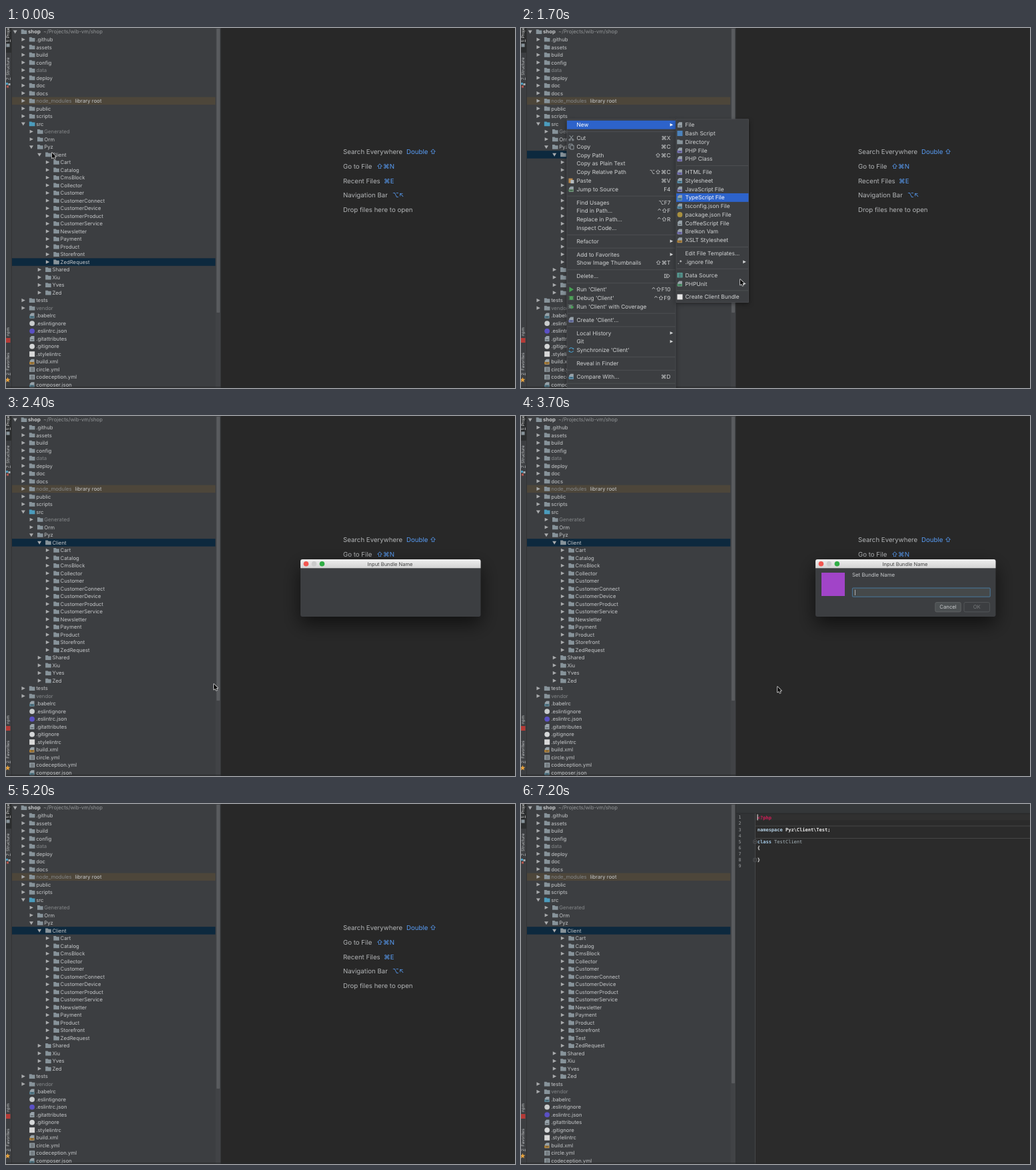
These frames come from a looping animation (764 by 540 pixels, 7.3 s). An HTML page with a canvas:

```html
<!DOCTYPE html>
<html lang="en">
<head>
<meta charset="utf-8">
<title>Create a bundle</title>
<style>
html, body { margin: 0; width: 100%; height: 100%; overflow: hidden; background: #282828; }
canvas { display: block; width: 764px; height: 540px; }
</style>
</head>
<body>
<canvas id="stage" width="764" height="540"></canvas>
<script>
const ctx = document.getElementById('stage').getContext('2d');
const LOOP = 7300, STEP = 100;
const UI = 'Inter, "DejaVu Sans", sans-serif';
const MONO = '"DejaVu Sans Mono", monospace';
const PANEL = '#3c3e41', TEXT = '#c6c8ca', BLUE = '#2d63cb';
ctx.textRendering = 'geometricPrecision';

// Moments at which the picture switches
const AT = { menu: 600, hoverNew: 1100, submenu: 1300, menuEnd: 2100, dialog: 2300,
  form: 2600, typing: 4100, close: 5000, editor: 5700 };

function rect(x, y, w, h, color) {
  ctx.fillStyle = color;
  ctx.fillRect(x, y, w, h);
}

function box(x, y, w, h, r, fill, stroke) {
  ctx.beginPath();
  ctx.roundRect(x, y, w, h, r);
  if (fill) { ctx.fillStyle = fill; ctx.fill(); }
  if (stroke) { ctx.strokeStyle = stroke; ctx.lineWidth = 0.8; ctx.stroke(); }
}

function disc(x, y, r, color) {
  ctx.beginPath();
  ctx.arc(x, y, r, 0, Math.PI * 2);
  ctx.fillStyle = color;
  ctx.fill();
}

function poly(points, fill, stroke) {
  ctx.beginPath();
  points.forEach(([x, y]) => ctx.lineTo(x, y));
  ctx.closePath();
  if (stroke) { ctx.strokeStyle = stroke; ctx.lineWidth = 1.4; ctx.lineJoin = 'round'; ctx.stroke(); }
  ctx.fillStyle = fill;
  ctx.fill();
}

// Text whose capitals are centred on y
function text(s, x, y, size, color = TEXT, { weight = 400, family = UI, align = 'left' } = {}) {
  ctx.font = `${weight} ${size}px ${family}`;
  ctx.textAlign = align;
  ctx.fillStyle = color;
  ctx.fillText(s, x, y + size * 0.36);
}

function arrowRight(x, y, color = '#a9abad', s = 2.7) {
  poly([[x - s, y - s], [x + s, y], [x - s, y + s]], color);
}

function arrowDown(x, y) {
  poly([[x - 3, y - 2.2], [x + 3, y - 2.2], [x, y + 2.8]], '#a9abad');
}

// Small icons, all centred on x, y
const icons = {
  folder(x, y, color = '#87939a') {
    poly([[x - 4.3, y - 3.4], [x - 0.8, y - 3.4], [x + 0.4, y - 2.2], [x + 4.3, y - 2.2],
      [x + 4.3, y + 3.4], [x - 4.3, y + 3.4]], color);
  },
  page(x, y, color) {
    poly([[x - 1, y - 4], [x + 3.4, y - 4], [x + 3.4, y + 4], [x - 3.4, y + 4], [x - 3.4, y - 1.6]], '#97a2a9');
    if (color) rect(x - 4, y + 0.3, 7.2, 3.4, color);
    rect(x - 2, y + 1.3, 4, 0.8, '#3a3f43');
  },
  grid(x, y, color = '#929da3') {
    rect(x - 4, y - 3.7, 8, 7.4, color);
    [-1.5, 1].forEach(d => rect(x + d, y - 2.7, 0.8, 5.8, PANEL));
  },
  disc(x, y, color) { disc(x, y, 3.9, color); },
  square(x, y, color) { rect(x - 4, y - 4, 8, 8, color); },
  cut(x, y) {
    ctx.strokeStyle = '#a6b0b6'; ctx.lineWidth = 0.9;
    ctx.beginPath();
    ctx.moveTo(x - 2.6, y - 4); ctx.lineTo(x + 2, y + 2);
    ctx.moveTo(x + 2.6, y - 4); ctx.lineTo(x - 2, y + 2);
    ctx.stroke();
    box(x - 3.6, y + 1.4, 2.4, 2.4, 1.2, null, '#a6b0b6');
    box(x + 1.2, y + 1.4, 2.4, 2.4, 1.2, null, '#a6b0b6');
  },
  copy(x, y) {
    box(x - 3.6, y - 3.8, 5.2, 6, 0, null, '#a6b0b6');
    box(x - 1.4, y - 1.8, 5, 5.8, 0, PANEL, '#a6b0b6');
  },
  paste(x, y) {
    rect(x - 4, y - 3.4, 6, 7, '#b98a4e');
    rect(x - 1, y - 1, 5, 5.2, '#b4bcc1');
  },
  run(x, y) { poly([[x - 3, y - 4], [x + 3.6, y], [x - 3, y + 4]], '#45a052'); },
  bug(x, y, color = '#4fa35a') {
    disc(x, y, 2.7, color);
    ctx.strokeStyle = color; ctx.lineWidth = 0.8;
    ctx.beginPath();
    for (let d = -2.4; d < 3; d += 2.4) { ctx.moveTo(x - 4, y + d); ctx.lineTo(x + 4, y + d); }
    ctx.stroke();
  },
  coverage(x, y) { icons.bug(x - 1, y, '#71817c'); poly([[x, y - 2], [x + 4, y + 1], [x, y + 4]], '#45a052'); },
  sync(x, y) {
    ctx.strokeStyle = '#4694bd'; ctx.lineWidth = 1.2;
    [0.4, 3.55].forEach(a => { ctx.beginPath(); ctx.arc(x, y, 3.3, a, a + 2.3); ctx.stroke(); });
    disc(x - 3, y + 1.8, 1, '#4694bd'); disc(x + 3, y - 1.8, 1, '#4694bd');
  },
  ignore(x, y) { text('.*', x, y, 8, TEXT, { align: 'center', weight: 700 }); },
  star(x, y) {
    poly(Array.from({ length: 10 }, (_, i) => {
      const a = i * Math.PI / 5 - Math.PI / 2, r = i % 2 ? 1.8 : 4.2;
      return [x + r * Math.cos(a), y + r * Math.sin(a)];
    }), '#e8a33d');
  }
};

function icon(spec, x, y) {
  const [kind, color] = spec.split(' ');
  icons[kind](x, y, color);
}

// Tree rows: [depth, name, state, icon]; state is 'open', 'closed' or 'file'
const folders = (depth, names) => names.split(' ').map(n => [depth, n, 'closed', 'folder']);
const opened = (depth, name, spec = 'folder') => [depth, name, 'open', spec];
const files = [
  ['.babelrc', 'page #527f91'], ['.eslintignore', 'disc #c9cccd'], ['.eslintrc.json', 'disc #5a50c4'],
  ['.gitattributes', 'page'], ['.gitignore', 'disc #d5d7d8'], ['.stylelintrc', 'square #d8d8d8'],
  ['build.xml', 'page #b5812f'], ['circle.yml', 'grid'], ['codeception.yml', 'grid'],
  ['composer.json', 'page #527f91']
].map(([name, spec]) => [1, name, 'file', spec]);

function treeRows(withTest) {
  return [
    opened(0, 'shop'),
    ...folders(1, '.github assets build config data deploy doc docs node_modules public scripts'),
    opened(1, 'src', 'folder #4b9cbd'),
    ...folders(2, 'Generated Orm'),
    opened(2, 'Pyz'),
    opened(3, 'Client'),
    ...folders(4, 'Cart Catalog CmsBlock Collector Customer CustomerConnect CustomerDevice CustomerProduct ' +
      'CustomerService Newsletter Payment Product Storefront ' + (withTest ? 'Test ' : '') + 'ZedRequest'),
    ...folders(3, 'Shared Xiu Yves Zed'),
    ...folders(1, 'tests vendor'),
    ...files
  ];
}
const rowsBefore = treeRows(false), rowsAfter = treeRows(true);
const dimmed = ['data', 'node_modules', 'Generated', 'vendor'];

function drawTree(t) {
  const rows = t >= AT.editor ? rowsAfter : rowsBefore;
  const selected = t < AT.menu ? 'ZedRequest' : 'Client';
  rect(0, 0, 323, 540, PANEL);
  rows.forEach(([depth, name, state, spec], i) => {
    const y = 5.7 + 11.51 * i, x = 33 + 12.15 * depth;
    if (name === selected) rect(9, y - 5.7, 305.5, 11.5, '#0d293e');
    if (name === 'node_modules') rect(9, y - 5.7, 305.5, 11.5, '#4d463a');
    if (state === 'open') arrowDown(x - 19.3, y);
    if (state === 'closed') arrowRight(x - 19, y);
    icon(spec, x - 6, y);
    text(name, x, y, 7.75, dimmed.includes(name) ? '#838688' : TEXT, { weight: depth ? 400 : 700 });
    if (name === 'shop') text('~/Projects/wib-vm/shop', 56, y, 7.75, '#929597');
    if (name === 'node_modules') text('library root', 103.5, y, 7.75);
  });
  rect(314.5, 0, 8, 540, '#414346');
  box(316, 1, 5, t >= AT.editor ? 418 : 426, 1, '#595b5e');
  rect(322, 0, 1.2, 540, '#2f3132');
}

function sideLabel(s, y, color = TEXT) {
  ctx.save();
  ctx.translate(3.2, y);
  ctx.rotate(-Math.PI / 2);
  text(s, 0, 0, 6.2, color);
  if (/^\d/.test(s)) rect(0, 3, 3.6, 0.6, color);
  ctx.restore();
}

function drawSidebar() {
  rect(0, 0, 8, 540, PANEL);
  rect(0, 0, 8, 37, '#2c2e2f');
  rect(8, 0, 0.9, 540, '#313334');
  sideLabel('1: Project', 21, '#f0f0f0');
  rect(0.5, 23.5, 5, 5, '#87939a');
  sideLabel('7: Structure', 78);
  rect(0, 82, 3, 3, '#4b9cbd');
  rect(3.5, 83, 3, 3, '#a9b1b6');
  rect(1, 86.5, 3, 3, '#b7574f');
  sideLabel('npm', 462);
  rect(0, 465, 6.5, 7, '#b53a36');
  sideLabel('2: Favorites', 521);
  icons.star(2.5, 528);
}

function drawWelcome() {
  rect(323, 0, 441, 540, '#282828');
  [['Search Everywhere', 'Double ⇧', 601], ['Go to File', '⇧⌘N', 556], ['Recent Files', '⌘E', 567],
    ['Navigation Bar', '⌥↖', 580], ['Drop files here to open']].forEach(([label, keys, x], i) => {
    const y = 185.5 + 21.8 * i;
    text(label, 506, y, 9.68, '#b2b4b6');
    if (keys) text(keys, x, y, 9.68, '#589df6');
  });
}

function drawEditor() {
  rect(323, 0, 441, 540, '#2b2b2b');
  rect(323, 0, 28.5, 540, '#313335');
  rect(323, 0, 441, 14, '#343739');
  rect(323, 13.6, 441, 0.8, '#282a2b');
  rect(351.5, 15.2, 412.5, 9.2, '#303030');
  rect(351, 14, 0.8, 526, '#4b4d4f');
  const lineY = n => 20 + 9.13 * (n - 1);
  const code = (s, col, n, color, weight = 700) =>
    text(s, 354.8 + 4.215 * col, lineY(n), 7, color, { weight, family: MONO });
  for (let n = 1; n < 10; n++) text(n, 330.5, lineY(n), 6.5, '#a0a3a5', { family: MONO, align: 'right' });
  [32.6, 51].forEach(y => rect(351.5, y, 412.5, 0.8, '#4c4c4c'));
  code('<?php', 0, 1, '#d81b58');
  code('namespace', 0, 3, '#b5d0e4');
  code('Pyz\\Client\\Test;', 10, 3, '#eeeeee');
  code('class', 0, 5, '#a5cbe8');
  code('TestClient', 6, 5, '#a9b7bd', 400);
  code('{', 0, 6, '#eeeeee');
  code('}', 0, 8, '#eeeeee');
  [5, 8].forEach(n => {
    box(349, lineY(n) - 2.4, 4.6, 4.8, 0.5, '#2b2b2b', '#606366');
    rect(350, lineY(n) - 0.3, 2.6, 0.6, '#85888a');
  });
  rect(354.6, 15.4, 1, 9, '#f0e5e9');
}

// Menu items: [label, shortcut, icon]; '>' marks a submenu, null a separator
const contextMenu = [
  ['New', '>'], null,
  ['Cut', '⌘X', 'cut'], ['Copy', '⌘C', 'copy'], ['Copy Path', '⇧⌘C'], ['Copy as Plain Text'],
  ['Copy Relative Path', '⌥⇧⌘C'], ['Paste', '⌘V', 'paste'], ['Jump to Source', 'F4', 'page #5a8a62'], null,
  ['Find Usages', '⌥F7'], ['Find in Path...', '⌃⇧F'], ['Replace in Path...', '⌃⇧R'], ['Inspect Code...'], null,
  ['Refactor', '>'], null,
  ['Add to Favorites', '>'], ['Show Image Thumbnails', '⇧⌘T'], null,
  ['Delete...', '⌦'], null,
  ["Run 'Client'", '⌃⇧F10', 'run'], ["Debug 'Client'", '⌃⇧F9', 'bug'],
  ["Run 'Client' with Coverage", '', 'coverage'], null,
  ["Create 'Client'...", '', 'page #6f78b5'], null,
  ['Local History', '>'], ['Git', '>'], ["Synchronize 'Client'", '', 'sync'], null,
  ['Reveal in Finder'], null,
  ['Compare With...', '⌘D', 'page #4f8cab'], null
];
const newMenu = [
  ['File', '', 'page'], ['Bash Script', '', 'square #4b83bd'], ['Directory', '', 'folder'],
  ['PHP File', '', 'page #7771b8'], ['PHP Class', '', 'page #7771b8'], null,
  ['HTML File', '', 'page #7771b8'], ['Stylesheet', '', 'page #4f8cab'], ['JavaScript File', '', 'page #7771b8'],
  ['TypeScript File', '', 'page #4f8cab'], ['tsconfig.json File', '', 'page #4f8cab'],
  ['package.json File', '', 'disc #a8903f'], ['CoffeeScript File', '', 'page'],
  ['Brelkon Vam', '', 'page #7771b8'], ['XSLT Stylesheet', '', 'page #b5812f'], null,
  ['Edit File Templates...'], ['.ignore file', '>', 'ignore'], null,
  ['Data Source', '', 'grid #58a39a'], ['PHPUnit', '>', 'page #4f9a6b'], null,
  ['Create Client Bundle', '', 'square #e6e6e6']
];

function drawMenu(items, x, w, bottom, textX, active) {
  const top = 136.8;
  ctx.save();
  ctx.shadowColor = 'rgba(0,0,0,.45)';
  ctx.shadowBlur = 7;
  ctx.shadowOffsetY = 2;
  rect(x, top, w, bottom - top, PANEL);
  ctx.restore();
  box(x, top, w, bottom - top, 0, null, '#4d4f52');
  let y = 145.3;
  items.forEach(item => {
    if (!item) {
      rect(x + 0.5, y - 2.8, w - 1, 0.8, '#515356');
      y += 7.15;
      return;
    }
    const [label, keys, spec] = item, on = label === active;
    const color = on ? '#ffffff' : '#d0d2d3';
    if (on) rect(x, y - 6.5, w, 12.9, BLUE);
    if (spec) icon(spec, textX - 8, y);
    text(label, textX, y, 8.4, color);
    if (keys === '>') arrowRight(x + w - 6, y, color, 2.3);
    else if (keys) text(keys, x + w - 7.5, y, 8.4, color, { align: 'right' });
    y += 12.75;
  });
}

function drawMenus(t) {
  if (t < AT.menu || t >= AT.menuEnd) return;
  const main = t >= AT.hoverNew ? 'New' : t >= 900 ? 'Cut' : '';
  drawMenu(contextMenu, 69, 163, 545, 83.5, main);
  if (t < AT.submenu) return;
  const hover = t >= 1900 ? 'Create Client Bundle' : t >= 1800 ? 'PHPUnit' :
    t >= 1700 ? 'TypeScript File' : t >= 1600 ? 'Directory' : t >= 1500 ? 'File' : '';
  drawMenu(newMenu, 233, 108.5, 411.5, 246.5, hover);
}

function drawDialog(t) {
  if (t < AT.dialog || t >= AT.close) return;
  ctx.save();
  ctx.shadowColor = 'rgba(0,0,0,.6)';
  ctx.shadowBlur = 28;
  ctx.shadowOffsetY = 11;
  box(442, 215, 270.5, 86, 3, PANEL);
  ctx.restore();
  const bar = ctx.createLinearGradient(0, 215, 0, 228);
  bar.addColorStop(0, '#efefef');
  bar.addColorStop(1, '#d3d3d3');
  box(442, 215, 270.5, 13.2, [3, 3, 0, 0], bar);
  ['#f25650', '#cbcbcb', '#30ad45'].forEach((c, i) => disc(450.4 + 12 * i, 221.7, 3.8, c));
  text('Input Bundle Name', 576.5, 221.9, 7.56, '#414141', { align: 'center' });
  if (t < AT.form) return;

  const typed = 'Test'.slice(0, Math.max(0, Math.floor((t - AT.typing) / 150) + 1));
  rect(451, 235, 35, 35, '#a144c8');
  text('Set Bundle Name', 497, 238.3, 7.86);
  box(497.4, 258, 206.8, 13.2, 1, '#45494a', '#4b86b4');
  text(typed, 501, 264.7, 7.86);
  rect(501.2 + (typed ? ctx.measureText(typed).width : 0), 260.6, 0.8, 8.4, '#c8cacb');
  box(621.8, 279.6, 38.4, 14.2, 2, '#4c5052', '#656869');
  text('Cancel', 641, 286.7, 7.75, TEXT, { align: 'center' });
  box(665, 279.6, 38.4, 14.2, 2, typed ? '#365880' : PANEL, typed ? '#4c708c' : '#595c5e');
  text('OK', 684.2, 286.7, 7.75, typed ? TEXT : '#777a7c', { align: 'center' });
}

// Pointer path: [time, x, y]
const path = [[0, 69, 187], [500, 69, 187], [700, 73, 183], [900, 92, 162], [1000, 108, 145], [1200, 150, 145],
  [1400, 232, 146], [1500, 258, 150], [1600, 290, 220], [1700, 329, 377], [1900, 316, 401],
  [2100, 312, 402], [2600, 312, 402], [3100, 385, 406], [AT.typing, 385, 406]];

function drawPointer(t) {
  const i = path.findIndex(p => p[0] > t);
  if (i < 0) return;
  const [t0, x0, y0] = path[i - 1], [t1, x1, y1] = path[i];
  const k = (t - t0) / (t1 - t0), x = x0 + (x1 - x0) * k, y = y0 + (y1 - y0) * k;
  const shape = [[0, 0], [0, 8.6], [2, 6.8], [3.4, 9.8], [4.8, 9.2], [3.5, 6.2], [6, 6]];
  poly(shape.map(([dx, dy]) => [x + dx, y + dy]), '#0a0a0a', '#e8e8e8');
}

function draw(now) {
  const t = Math.floor((now % LOOP) / STEP) * STEP;
  ctx.clearRect(0, 0, 764, 540);
  drawTree(t);
  drawSidebar();
  if (t >= AT.editor) drawEditor();
  else drawWelcome();
  rect(0, 538.3, 764, 1, '#252728');
  drawMenus(t);
  drawDialog(t);
  drawPointer(t);
}

let start;
function tick(now) {
  start ??= now;
  draw(Math.max(0, now - start));
  requestAnimationFrame(tick);
}
draw(0);
requestAnimationFrame(tick);
</script>
</body>
</html>
```
